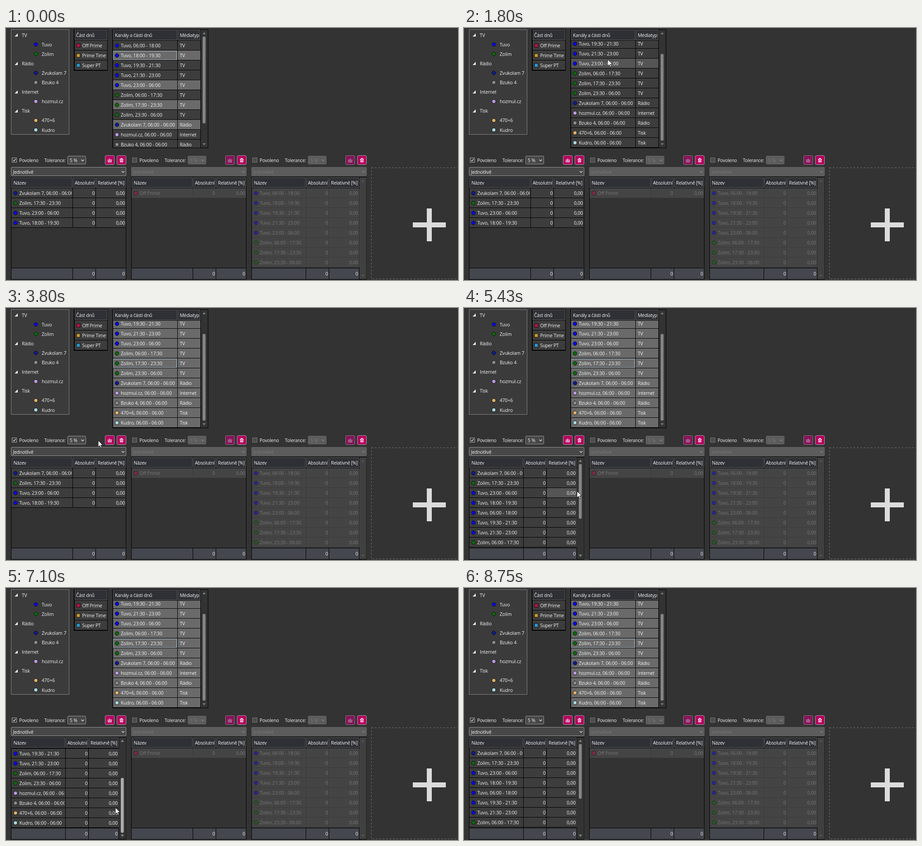
An HTML page that plays this animation: 1000 by 560 pixels, repeating every 9.51 s.

```html
<!DOCTYPE html>
<html lang="cs">
<head>
<meta charset="utf-8">
<title>Kanály a části dnů</title>
<style>
html, body { margin: 0; width: 100%; height: 100%; overflow: hidden; background: #333; }
svg { display: block; }
text { font: 10.3px "Open Sans", "Noto Sans", sans-serif; fill: #f4f4f4; letter-spacing: -.08px; white-space: pre; }
text.label { letter-spacing: -.22px; }
text.end { text-anchor: end; }
.dim text { fill: #787878; }
.dim .mark { opacity: .5; }
.line { fill: none; stroke: #ddd; stroke-width: 1.3; }
.dim .line { stroke: #858585; }
</style>
</head>
<body>
<svg id="stage" width="1000" height="560" viewBox="0 0 1000 560"></svg>
<script>
const LOOP = 9510;
const ROW = '#3d3d3d', HOVER = '#555', PICKED = '#6a6a6a', THUMB = '#858585', THUMB_HOT = '#adadad';
const HEAD = '#2f3035', HEAD_EDGE = '#666', FOOT = '#45474e', BG = '#333';

const channels = {
  a: ['Tuvo', '#0808e8', 'TV'],
  b: ['Zolim', '#0a6a0a', 'TV'],
  c: ['Zvukolam 7', '#0c1c90', 'Rádio'],
  d: ['Bzuko 4', '#8c8c8c', 'Rádio'],
  e: ['hozmul.cz', '#be9ae0', 'Internet'],
  f: ['470+6', '#e2b068', 'Tisk'],
  g: ['Kudro', '#a8d8dc', 'Tisk']
};
const slots = [
  'a06:00 - 18:00', 'a18:00 - 19:30', 'a19:30 - 21:30', 'a21:30 - 23:00', 'a23:00 - 06:00',
  'b06:00 - 17:30', 'b17:30 - 23:30', 'b23:30 - 06:00', 'c06:00 - 06:00',
  'e06:00 - 06:00', 'd06:00 - 06:00', 'f06:00 - 06:00', 'g06:00 - 06:00'
].map(s => {
  const [name, color, type] = channels[s[0]];
  return { text: `${name}, ${s.slice(1)}`, color, type };
});
const dayparts = [['Off Prime', '#b8104c'], ['Prime Time', '#c89a30'], ['Super PT', '#2c98c8']]
  .map(([text, color]) => ({ text, color, square: true }));

const rect = (x, y, w, h, fill, more = '') =>
  `<rect x="${x}" y="${y}" width="${w}" height="${h}" fill="${fill}" ${more}/>`;
const head = (x, y, w) => rect(x + .5, y + .5, w - 1, 22, HEAD, `stroke="${HEAD_EDGE}"`);
const label = (x, y, s, cls = '') => `<text x="${x}" y="${y}" class="${cls}">${s}</text>`;
const dot = (x, y, color) =>
  `<circle class="mark" cx="${x}" cy="${y}" r="4.2" fill="${color}" stroke="#111"/>`;
const square = (x, y, color) =>
  rect(x - 4, y - 4, 8, 8, color, 'class="mark" stroke="#111"');
const mark = (x, y, item) => (item.square ? square : dot)(x, y, item.color);
const clip = (x, y, w, h, body) =>
  `<svg x="${x}" y="${y}" width="${w}" height="${h}" viewBox="${x} ${y} ${w} ${h}">${body}</svg>`;
const arrow = (x, y, dir, fill) =>
  `<path d="M${x - 3.5} ${y + 2 * dir}h7l-3.5 ${-5 * dir}z" fill="${fill}"/>`;
const chevron = (x, y) => `<path class="line" d="M${x - 3} ${y - 1.5}l3 3 3-3"/>`;

function tree() {
  const lines = ['TV', 'a', 'b', 'Rádio', 'c', 'd', 'Internet', 'e', 'Tisk', 'f', 'g'];
  return rect(11.5, 3.5, 128, 233, '#3b3b3b', 'stroke="#858585"') + lines.map((key, i) => {
    const y = 15.5 + 21.1 * i, ch = channels[key];
    return ch
      ? dot(66, y, ch[1]) + label(79, y + 4, ch[0])
      : `<path d="M26 ${y - 3.5}v7h-7z" fill="#eee"/>` + label(35, y + 4, key, 'label');
  }).join('');
}

function dayTable() {
  return rect(150, 3, 75, 92, '#000') + head(152, 4, 72) + label(155, 20, 'Část dnů', 'label') +
    dayparts.map((p, i) => {
      const y = 28 + 22 * i;
      return rect(152, y, 72, 21, ROW) + mark(160, y + 11, p) + label(168.5, y + 15, p.text, 'label');
    }).join('');
}

function channelTable() {
  const rows = slots.map((s, i) => {
    const y = 28 + 22 * i;
    return rect(237, y, 142, 21, ROW, 'class="pick"') + rect(380, y, 50, 21, ROW, 'class="pick"') +
      dot(245.5, y + 11, s.color) + label(254, y + 15, s.text) + label(384.5, y + 15, s.type, 'label');
  }).join('');
  return rect(235.5, 3, 212, 264, '#000') +
    head(237, 4, 142) + head(380, 4, 50) + rect(431, 4, 15.5, 262, BG) +
    label(241, 20, 'Kanály a části dnů', 'label') + label(384.5, 20, 'Médiatyp', 'label') +
    clip(237, 28, 193, 238, `<g id="list">${rows}${rect(237.5, 29.5, 140, 19, 'none', 'id="focus" stroke="#9ab4c4"')}</g>`) +
    arrow(438.5, 12, 1, '#777') + arrow(438.5, 258, -1, '#777') +
    rect(435, 19, 6.5, 193, THUMB, 'id="topThumb" rx="3"');
}

// Coordinates are those of the leftmost panel
function resultTable(items, scroll, dim, id) {
  const s = scroll ? 16 : 0;
  const cols = [[12, 135 - s], [148 - s, 50], [199 - s, 66]];
  const band = (y, h, fill, more = '') => cols.map(([x, w]) => rect(x, y, w, h, fill, more)).join('');
  const rows = items.map((item, i) => {
    const y = 356 + 22 * i;
    return band(y, 21, dim ? '#444' : ROW, 'class="cell"') + mark(21, y + 11, item) +
      clip(12, y, 133.5 - s, 21, label(29.5, y + 15, item.text)) +
      label(196.5 - s, y + 15, '0', 'end') + label(263 - s, y + 15, '0,00', 'end');
  }).join('');
  const back = rect(12, 356, 253 - s, 22 * items.length, dim ? '#3b3b3b' : '#000');
  const bar = scroll
    ? rect(250, 332, 15.5, 226, dim ? '#404040' : BG) + arrow(257.5, 340, 1, dim ? '#555' : '#888') +
      arrow(257.5, 550, -1, dim ? '#555' : '#888') +
      (dim ? '' : rect(254, 346.5, 6.5, 122, THUMB, 'id="thumb" rx="3"'))
    : '';
  return `<g id="${id}">` + rect(11, 331, 255, 228, '#000') + rect(12, 356, 253, 177, BG) +
    cols.map(([x, w]) => head(x, 332, w)).join('') + band(534, 24, FOOT) +
    label(16.5, 348, 'Název', 'label') + label(152 - s, 348, 'Absolutní', 'label') +
    label(203 - s, 348, 'Relativně [%]', 'label') +
    clip(12, 356, 253, 177, `<g class="rows${dim ? ' dim' : ''}">${back}${rows}</g>`) +
    label(196.5 - s, 550, '0', 'end') + label(263 - s, 550, '0', 'end') + bar + '</g>';
}

function panel(x, on, tables) {
  const edge = on ? '#999' : '#666', fill = on ? '#484848' : '#5c5c5c';
  const button = (bx, dim, icon) =>
    rect(bx, 283.5, 20, 20, dim ? '#86155a' : '#b4005e', `rx="2.5" stroke="${dim ? '#85757f' : '#b0a0aa'}"`) +
    `<path d="${icon}" transform="translate(${bx + 10} 294)" fill="none" stroke="${dim ? '#b59aaa' : '#fff'}" stroke-width="1.3"/>`;
  return `<g transform="translate(${x})">` +
    rect(13.5, 288.5, 10, 10, on ? '#3a3a3a' : '#4c4c4c', `stroke="${on ? '#aaa' : '#777'}"`) +
    (on ? '<path class="line" d="M15.8 293.5l2 2.3 3.8-5"/>' : '') +
    label(29, 298, 'Povoleno', 'label') + label(85, 298, 'Tolerance:', 'label') +
    `<g class="${on ? '' : 'dim'}">` +
    rect(136.5, 284.5, 40, 18, fill, `rx="2" stroke="${edge}"`) + label(141, 298, '5 %') + chevron(169.5, 294) +
    rect(11.5, 309.5, 254, 19, fill, `rx="1" stroke="${edge}"`) + label(15.5, 323.5, 'Jednotlivě', 'label') + chevron(259, 319.5) +
    '</g>' +
    button(219.5, !on, 'M-3.5-2v5.5h7V-2M0-4v5M-1.8-.6L0 1.2 1.8-.6') +
    button(245.5, false, 'M-4-2.7h8M-1.5-4h3M-2.8-2v5.5h5.6V-2M-1-.5l2 2.3M1-.5l-2 2.3') +
    tables + '</g>';
}

function addBox() {
  return rect(808.5, 310.5, 210, 247, BG, 'id="add" stroke="#777" stroke-dasharray="3.6 4"') +
    rect(900, 432, 73, 11, '#dcdcdc') + rect(931, 401, 11, 73, '#dcdcdc');
}

const at = list => list.map(i => slots[i]);
const first = [8, 6, 4, 1];
const all = [...first, 0, 2, 3, 5, 7, 9, 10, 11, 12];
const $ = id => document.getElementById(id);

$('stage').innerHTML = tree() + dayTable() + channelTable() +
  panel(0, true, resultTable(at(first), false, false, 'before') + resultTable(at(all), true, false, 'after')) +
  panel(266, false, resultTable(dayparts.slice(0, 1), false, true, 'second')) +
  panel(532, false, resultTable(slots.slice(0, 8), true, true, 'third')) +
  addBox() +
  '<path id="pointer" d="M0 0V14.5L3.4 11.3 5.7 16.6 7.9 15.6 5.6 10.5H10.2Z" fill="#fff" stroke="#111" stroke-width=".9"/>';

const picks = document.querySelectorAll('.pick');
const cells = document.querySelectorAll('#after .cell');
const resultRows = document.querySelector('#after .rows');

// Pointer moves: start, end, steps, from x y, to x y
const moves = [
  [510, 840, 4, 930, 440, 438, 98],
  [940, 1150, 3, 329, 61, 318, 44],
  [1810, 2460, 7, 318, 70, 304, 248],
  [3010, 3230, 3, 304, 200, 303, 117],
  [3570, 4140, 6, 290, 160, 75, 496],
  [4770, 4880, 2, 100, 498, 132, 495],
  [5120, 5330, 3, 160, 470, 238, 415],
  [5430, 5660, 3, 250, 407, 251, 403],
  [5980, 6440, 5, 251, 405, 251, 449.4],
  [6540, 6880, 4, 250, 460, 246, 483],
  [7000, 7100, 2, 244, 486, 242, 488],
  [7440, 7860, 5, 242, 468, 244, 433],
  [7960, 8300, 4, 246, 424, 252, 396],
  [8410, 8630, 3, 420, 410, 900, 470]
];

function pointerAt(t) {
  const move = moves.filter(m => m[0] <= t).pop();
  if (!move || t >= 8750) return null;
  const [t0, t1, n, x0, y0, x1, y1] = move;
  const p = Math.min(1, Math.floor((t - t0) / (t1 - t0) * (n - 1)) / (n - 1));
  return { x: x0 + (x1 - x0) * p, y: y0 + (y1 - y0) * p };
}

const TRAVEL = 75.5, MAX_SCROLL = 109;
function thumbAt(t, y) {
  if (t < 5980 || t >= 8300) return 0;
  if (t >= 6880 && t < 7440) return TRAVEL;
  return Math.max(0, Math.min(TRAVEL, y - (t < 7000 ? 403 : 396)));
}

const inside = (p, x, y, w, h) => p && p.x >= x && p.x <= x + w && p.y >= y && p.y < y + h;
const set = (el, name, value) => el.setAttribute(name, value);

function draw(t) {
  const p = pointerAt(t);
  set($('pointer'), 'visibility', p ? 'visible' : 'hidden');
  if (p) set($('pointer'), 'transform', `translate(${p.x} ${p.y})`);

  const carry = t >= 3460 && t < 4660;
  const grab = t >= 5980 && t < 8410;

  // Channel list
  const shift = t >= 1700 ? 48 : 0;
  const hotRow = !carry && inside(p, 237, 28, 193, 238) ? Math.floor((p.y - 28 + shift) / 22) : -1;
  const picked = i => t < 1370 ? first.includes(i) : t < 2790 ? i === 0 : true;
  picks.forEach((el, k) => {
    const i = k >> 1;
    set(el, 'fill', picked(i) ? PICKED : i === hotRow ? HOVER : ROW);
  });
  const focus = t < 1370 ? 1 : t < 2790 ? 0 : t < 3460 ? 12 : 6;
  set($('focus'), 'y', 29.5 + 22 * focus);
  set($('list'), 'transform', `translate(0 ${-shift})`);
  set($('topThumb'), 'y', shift ? 57.5 : 19);
  set($('topThumb'), 'fill', inside(p, 432, 19, 14, 193) ? THUMB_HOT : THUMB);

  // First result table
  const full = t >= 4660;
  set($('before'), 'display', full ? 'none' : 'inline');
  set($('after'), 'display', full ? 'inline' : 'none');
  const pos = thumbAt(t, p ? p.y : 0);
  set($('thumb'), 'y', 346.5 + pos);
  set($('thumb'), 'fill', grab || inside(p, 250.4, 346, 15, 122) ? THUMB_HOT : THUMB);
  set(resultRows, 'transform', `translate(0 ${-pos / TRAVEL * MAX_SCROLL})`);
  let hot = -1;
  if (full && !grab && inside(p, 12, 356, 238, 177)) {
    hot = Math.floor((p.y - 356) / 22) * 3 + (p.x < 132 ? 0 : p.x < 183 ? 1 : 2);
  }
  cells.forEach((el, k) => set(el, 'fill', k === hot ? HOVER : ROW));

  set($('add'), 'fill', inside(p, 809, 311, 191, 248) ? '#404040' : BG);
}

const SLACK = 15;
function tick() {
  draw(performance.now() % LOOP + SLACK);
  requestAnimationFrame(tick);
}
tick();
</script>
</body>
</html>
```
